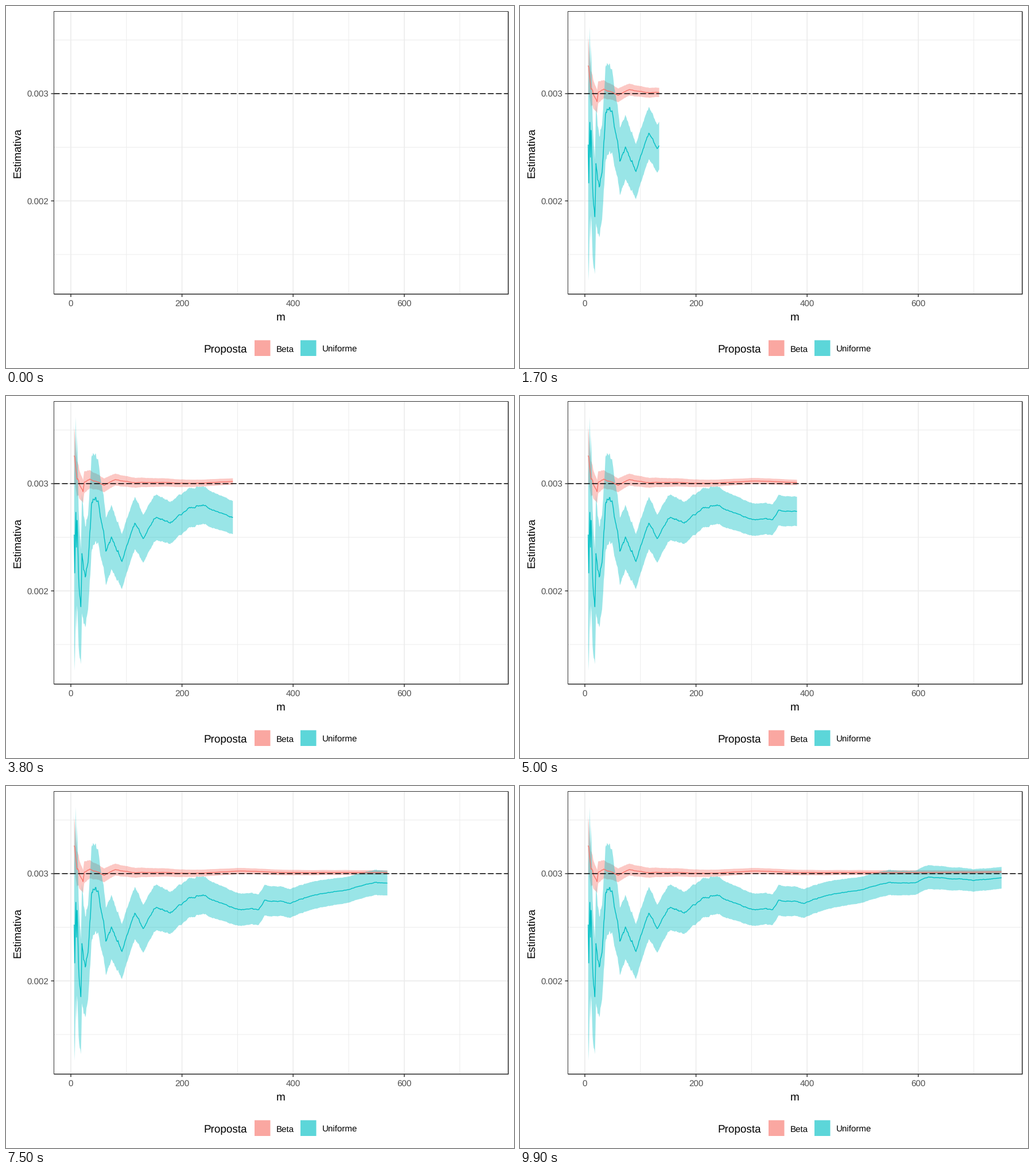
A matplotlib script for the animation above (10 s loop, 885 by 632 pixels).

```python
import numpy as np
import matplotlib.pyplot as plt
from matplotlib.animation import FuncAnimation
from matplotlib.patches import Polygon, Rectangle

W, H, DPI = 885, 632, 100
FRAMES, INTERVAL = 100, 100
M0, M1 = 6, 750
LEFT, TOP, RIGHT, BOTTOM = 83.5, 9.5, 875, 503
PT = 72 / DPI  # points per pixel
RED, CYAN = "#F8766D", "#00BFC4"
GRID, DARK, GREY = "#EBEBEB", "#333333", "#4D4D4D"
TITLE, SMALL = 18.9, 15.1

plt.rcParams.update({"font.family": "Liberation Sans",
                     "text.hinting": "none", "path.snap": False})

# Main turns of the running estimates: m, height in pixels
UNIFORM = [
    (6, 242), (7, 309), (9, 203), (10, 264), (11, 217), (14, 318), (18, 368),
    (20, 275), (26, 316), (31, 290), (37, 190), (42, 181), (49, 183),
    (63, 271), (73, 246), (92, 289), (115, 222), (130, 249), (149, 215),
    (183, 219), (210, 197), (238, 190), (287, 211), (338, 216), (349, 199),
    (395, 205), (442, 190), (503, 180), (550, 168), (594, 169), (619, 159),
    (700, 165), (750, 160),
]
BETA = [
    (6, 104), (11, 145), (22, 167), (24, 151), (34, 145), (60, 156),
    (80, 146), (111, 151), (142, 151), (240, 152), (302, 148.5),
    (381, 151), (750, 150),
]


def px(m):
    return 113 + 0.968 * m


def py(v):
    return 153 - (v - 0.003) * 187300


fig = plt.figure(figsize=(W / DPI, H / DPI), dpi=DPI, facecolor="white")
ax = fig.add_axes([0, 0, 1, 1])
ax.set_xlim(0, W)
ax.set_ylim(H, 0)
ax.axis("off")


def segment(x, y, color, width, z, **kw):
    return ax.plot(x, y, color=color, lw=width * PT, zorder=z,
                   solid_capstyle="butt", **kw)[0]


def label(x, y, s, size, color="black", **kw):
    ax.text(x, y, s, fontsize=size * PT, color=color, va="baseline",
            rotation_mode="anchor", **kw)


def grid_line(width, m=None, v=None):
    if v is None:
        segment([px(m)] * 2, [TOP, BOTTOM], GRID, width, 1)
    else:
        segment([LEFT, RIGHT], [py(v)] * 2, GRID, width, 1)


def draw_axes():
    for m in (100, 300, 500, 700):
        grid_line(0.9, m=m)
    for v in (0.0015, 0.0025, 0.0035):
        grid_line(0.9, v=v)
    for m in (0, 200, 400, 600):
        grid_line(1.6, m=m)
        segment([px(m)] * 2, [BOTTOM, BOTTOM + 5], DARK, 1.5, 6)
        label(px(m), 524, str(m), SMALL, GREY, ha="center")
    for v in (0.002, 0.003):
        grid_line(1.6, v=v)
        segment([LEFT - 5, LEFT], [py(v)] * 2, DARK, 1.5, 6)
        label(74.3, py(v) + 5.3, f"{v:.3f}", SMALL, GREY, ha="right")
    segment([LEFT, RIGHT], [py(0.003)] * 2, "black", 1.5, 5,
            dashes=(10 / 1.5, 4 / 1.5), dash_capstyle="butt")
    # The panel clips its border, so the left and top sides look thinner
    segment([LEFT, LEFT, RIGHT], [BOTTOM, TOP, TOP], DARK, 1, 6)
    segment([RIGHT, RIGHT, LEFT], [TOP, BOTTOM, BOTTOM], DARK, 1.6, 6)
    label(478.5, 549, "m", TITLE, ha="center")
    label(25.5, 256.3, "Estimativa", TITLE, rotation=90, ha="center")


def draw_legend():
    label(344.3, 605, "Proposta", TITLE)
    for x, name, color in ((433, "Beta", RED), (513, "Uniforme", CYAN)):
        ax.add_patch(Rectangle((x, 583.5), 27.5, 27.5, fc=color, alpha=0.64,
                               lw=0))
        label(x + 38, 603.5, name, SMALL)


class Band:
    """Running estimate with its interval, revealed from left to right."""

    def __init__(self, turns, spread, sd, color, z, seed):
        rng = np.random.default_rng(seed)
        m, y = np.transpose(turns)
        self.m = np.arange(M0, M1 + 1)
        # Running-mean steps shrink as 1/m; pin the walk to the main turns
        walk = np.cumsum(sd / self.m * rng.standard_normal(self.m.size))
        pinned = walk - np.interp(self.m, m, np.interp(m, self.m, walk))
        self.y = np.interp(self.m, m, y) + pinned
        self.half = spread(self.m, self.y) / np.sqrt(self.m)
        self.area = ax.add_patch(Polygon([(0, 0)] * 3, fc=color, alpha=0.4,
                                         lw=0, zorder=z))
        self.line = segment([], [], color, 1.4, 4, solid_joinstyle="round")

    def reveal(self, end):
        m = np.append(self.m[self.m < end], end)
        y = np.interp(m, self.m, self.y)
        half = np.interp(m, self.m, self.half)
        x = px(m)
        self.line.set_data(x, y)
        self.area.set_xy(np.column_stack([
            np.append(x, x[::-1]), np.append(y - half, (y + half)[::-1])]))


draw_axes()
draw_legend()
bands = [
    Band(BETA, lambda m, y: 93 + 27 * np.exp((M0 - m) / 5), 18, RED, 2, 3),
    Band(UNIFORM, lambda m, y: 590 - 0.45 * y, 130, CYAN, 3, 8),
]


def update(i):
    end = M0 + (M1 - M0) * i / (FRAMES - 1)
    for b in bands:
        b.reveal(end)
        b.area.set_visible(i > 0)
        b.line.set_visible(i > 0)
    return [a for b in bands for a in (b.area, b.line)]


anim = FuncAnimation(fig, update, frames=FRAMES, interval=INTERVAL,
                     init_func=lambda: update(0), repeat=True, repeat_delay=0)
plt.show()
```
